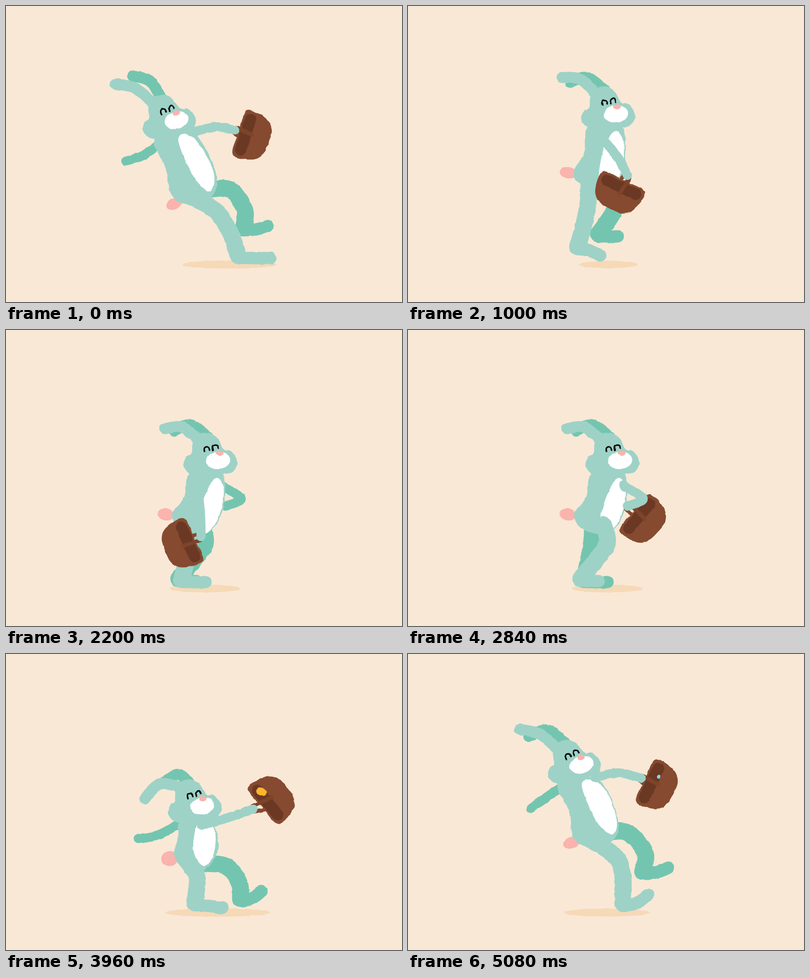
Recreate the animation shown at these times as an HTML page with a canvas. Size 800 by 600 pixels, loop 5.12 s.

```html
<!DOCTYPE html>
<html lang="en">
<head>
<meta charset="utf-8">
<title>Skipping rabbit</title>
<style>
  html, body { margin: 0; width: 100%; height: 100%; overflow: hidden; background: #f9e8d6; }
  canvas { display: block; filter: url(#rough); }
  svg { position: absolute; }
</style>
</head>
<body>
<svg width="0" height="0">
  <filter id="rough" x="0" y="0" width="100%" height="100%" color-interpolation-filters="sRGB">
    <feTurbulence type="fractalNoise" baseFrequency=".09" numOctaves="1" seed="4"/>
    <feDisplacementMap in="SourceGraphic" scale="4" xChannelSelector="R" yChannelSelector="G"/>
  </filter>
</svg>
<canvas id="stage" width="800" height="600"></canvas>
<script>
const ctx = document.getElementById('stage').getContext('2d');
const PERIOD = 1280, STEP = 40, RAD = Math.PI / 180;
const NEAR = '#9ed2c7', FAR = '#74c5b0', PINK = '#fab3ad', SHADOW = '#f6d9b6';
const BROWN = '#854a2f', DARK = '#6b3824', ORANGE = '#fdb52f', BLUE = '#86d8ff', PURPLE = '#7d6bb0';

// head: x, y, angle; tail: x, y, height, angle; shadow: x, radius; other parts are x, y pairs
const land = {
  head: [344, 231, -11], tail: [340, 401, 11, -25], shadow: [452, 95],
  nearEar: [221, 158, 262, 167], farEar: [256, 142, 291, 152],
  torso: [300, 268, 322, 328, 333, 380, 362, 401, 412, 390, 426, 350, 403, 288, 365, 250],
  belly: [348, 272, 372, 262, 402, 298, 421, 345, 411, 376, 378, 344],
  nearArm: [375, 256, 425, 245, 462, 252], farArm: [310, 280, 275, 304, 242, 314],
  nearLeg: [362, 382, 420, 412, 453, 460, 469, 506, 534, 511],
  farLeg: [400, 373, 452, 372, 482, 412, 480, 450, 529, 446]
};
const crouch = {
  head: [413, 319, -4], tail: [326, 410, 16, 0], shadow: [411, 103],
  nearEar: [300, 312, 328, 277], farEar: [333, 286, 362, 259],
  torso: [367, 345, 355, 378, 341, 410, 362, 440, 400, 443, 428, 408, 432, 370, 415, 340],
  belly: [398, 360, 425, 358, 431, 380, 418, 423, 396, 438, 380, 410],
  nearArm: [405, 363, 455, 353, 503, 334], farArm: [362, 356, 325, 380, 289, 393],
  nearLeg: [366, 418, 379, 455, 366, 480, 351, 504, 400, 511],
  farLeg: [395, 430, 434, 441, 456, 475, 457, 506, 499, 490]
};
const leanBack = {
  head: [319, 233, -20], tail: [337, 387, 16, 0], shadow: [436, 67],
  nearEar: [197, 175, 236, 175], farEar: [228, 154, 263, 161],
  torso: [303, 275, 314, 330, 328, 378, 356, 392, 400, 375, 413, 330, 398, 275, 355, 240],
  belly: [327, 275, 349, 251, 385, 270, 409, 330, 395, 375, 345, 345],
  nearArm: [290, 270, 251, 287, 233, 338], farArm: [360, 249, 405, 244, 451, 239],
  nearLeg: [355, 373, 425, 356, 466, 393, 462, 422, 517, 409],
  farLeg: [375, 365, 425, 408, 447, 450, 452, 486, 493, 470]
};
const upright = {
  head: [428, 264, 0], tail: [323, 374, 12, 10], shadow: [402, 72],
  nearEar: [321, 200, 356, 197], farEar: [340, 204, 372, 192],
  torso: [372, 290, 360, 338, 336, 375, 355, 405, 405, 412, 434, 375, 443, 325, 432, 285],
  belly: [400, 340, 424, 300, 440, 325, 430, 378, 405, 412, 386, 400],
  nearArm: [388, 325, 393, 375, 394, 419], farArm: [435, 315, 475, 342, 443, 357],
  nearLeg: [372, 388, 372, 420, 366, 460, 355, 506, 403, 511],
  farLeg: [395, 395, 403, 430, 385, 460, 349, 504, 385, 509]
};
const reach = {
  head: [350, 224, -13], tail: [330, 383, 12, -20], shadow: [402, 87],
  nearEar: [226, 153, 266, 162], farEar: [244, 167, 282, 154],
  torso: [303, 262, 325, 318, 333, 370, 360, 390, 410, 381, 425, 345, 405, 280, 370, 250],
  belly: [351, 266, 376, 256, 405, 285, 422, 340, 412, 366, 380, 338],
  nearArm: [378, 250, 425, 241, 471, 252], farArm: [310, 270, 280, 290, 248, 313],
  nearLeg: [362, 372, 419, 410, 434, 452, 434, 506, 485, 488],
  farLeg: [400, 362, 443, 362, 479, 402, 474, 441, 526, 433]
};

const combine = (a, b, rule) => Object.fromEntries(
  Object.keys(a).map(part => [part, a[part].map((v, i) => rule(v, b[part][i], part, i))]));
const swapSides = p => ({ ...p, nearArm: p.farArm, farArm: p.nearArm, nearLeg: p.farLeg, farLeg: p.nearLeg });
const raise = (p, dy) => combine(p, p, (v, _, part, i) =>
  part === 'shadow' || (part === 'head' || part === 'tail') && i !== 1 || i % 2 === 0 ? v : v - dy);

const apex = {
  ...raise(combine(upright, reach, (a, b) => (a + b) / 2), 68),
  shadow: [412, 58],
  nearArm: [395, 208, 440, 198, 482, 214], farArm: [340, 220, 305, 248, 258, 272],
  nearLeg: [360, 318, 386, 365, 388, 420, 378, 468, 420, 488],
  farLeg: [388, 322, 434, 320, 464, 360, 452, 402, 502, 404]
};
const leanOffset = combine(leanBack, swapSides(reach), (a, b) => a - b);
const landLeaning = combine(swapSides(land), leanOffset, (a, d) => a + 0.7 * d);

// basket: angle, then the hand's place relative to the opening
const keys = [
  [0, land, [-72, 1, -22]],
  [160, crouch, [-133, 9, -31]],
  [280, swapSides(upright), [-50, 0, -30]],
  [480, raise(swapSides(apex), 25), [75, 0, -30]],
  [600, leanBack, [30, -7, -38]],
  [640, landLeaning, [28, -6, -37]],
  [800, swapSides(crouch), [48, 0, -31]],
  [920, upright, [66, 1, -27]],
  [1120, apex, [-52, 0, -24]],
  [1240, reach, [-65, 0, -21]]
].map(([time, pose, basket]) => ({ time, pose: { ...pose, basket } }));

function keyAt(i) {
  const n = keys.length, turn = Math.floor(i / n), key = keys[i - turn * n];
  return { time: key.time + turn * PERIOD, pose: key.pose };
}

// Periodic cubic interpolation with unevenly spaced keys
function poseAt(t) {
  const i = keys.findLastIndex(k => k.time <= t);
  const [a, b, c, d] = [-1, 0, 1, 2].map(j => keyAt(i + j));
  const h0 = b.time - a.time, h1 = c.time - b.time, h2 = d.time - c.time;
  const u = (t - b.time) / h1, w = u * u * (3 - 2 * u);
  return combine(b.pose, b.pose, (v1, _, part, j) => {
    const v0 = a.pose[part][j], v2 = c.pose[part][j], v3 = d.pose[part][j];
    const s0 = (v1 - v0) / h0, s1 = (v2 - v1) / h1, s2 = (v3 - v2) / h2;
    const m1 = (s0 * h1 + s1 * h0) / (h0 + h1), m2 = (s1 * h2 + s2 * h1) / (h1 + h2);
    return v1 + (v2 - v1) * w + h1 * u * (1 - u) * (m1 * (1 - u) - m2 * u);
  });
}

function curve(flat, closed) {
  const n = flat.length / 2;
  const point = i => {
    const k = closed ? (i + n) % n : Math.max(0, Math.min(n - 1, i));
    return [flat[2 * k], flat[2 * k + 1]];
  };
  ctx.beginPath();
  ctx.moveTo(...point(0));
  for (let i = 0; i < (closed ? n : n - 1); i++) {
    const [a, b, c, d] = [-1, 0, 1, 2].map(j => point(i + j));
    ctx.bezierCurveTo(b[0] + (c[0] - a[0]) / 6, b[1] + (c[1] - a[1]) / 6,
      c[0] - (d[0] - b[0]) / 6, c[1] - (d[1] - b[1]) / 6, ...c);
  }
}
function fill(color) { ctx.fillStyle = color; ctx.fill(); }
function stroke(color, width) { ctx.strokeStyle = color; ctx.lineWidth = width; ctx.stroke(); }
function blob(flat, color) { curve(flat, true); fill(color); }
function limb(flat, color, width) { curve(flat, false); stroke(color, width); }
function oval(x, y, rx, ry, angle, color) {
  ctx.beginPath();
  ctx.ellipse(x, y, rx, ry, angle * RAD, 0, 7);
  fill(color);
}
function placed(x, y, angle, draw) {
  ctx.save();
  ctx.translate(x, y);
  ctx.rotate(angle * RAD);
  draw();
  ctx.restore();
}

function leg(flat, color) {
  const [ax, ay, tx, ty] = flat.slice(6);
  limb(flat.slice(0, 8), color, 34);
  ctx.beginPath();
  ctx.moveTo(ax, ay + 4.5);
  ctx.quadraticCurveTo(ax + 0.55 * (tx - ax), ay + 5, tx, ty);
  stroke(color, 25);
}

function ear(head, [tipX, tipY, midX, midY], baseX, baseY, color) {
  const c = Math.cos(head[2] * RAD), s = Math.sin(head[2] * RAD);
  limb([tipX, tipY, midX, midY, head[0] + baseX * c - baseY * s, head[1] + baseX * s + baseY * c], color, 22.5);
}

function drawHead([x, y, angle]) {
  placed(x, y, angle, () => {
    blob([-21, -56, -2, -46, 12, -22, 27, -18, 39, 3, 31, 23, 12, 28, -20, 32,
      -55, 28, -70, 10, -64, -7, -53, -14, -51, -34, -42, -50], NEAR);
    oval(0.5, 0.5, 24.5, 17.5, -5, '#fff');
    oval(3, -14, 7.5, 5.2, 0, PINK);
    for (const [ex, ey] of [[-22.5, -22], [-5, -25.5]]) {
      placed(ex, ey, -10, () => {
        ctx.beginPath();
        ctx.moveTo(-5.2, 4);
        ctx.arc(0, 0, 5.2, Math.PI, 0);
        ctx.lineTo(5.4, 2.5);
        stroke('#0b0b0b', 3.2);
      });
    }
  });
}

function drawBasket(p, t) {
  const [angle, hx, hy] = p.basket;
  placed(p.nearArm[4], p.nearArm[5], angle, () => {
    ctx.translate(-hx, -hy);
    ctx.beginPath();
    ctx.moveTo(-8, -10);
    ctx.lineTo(hx - 6, hy);
    stroke(BROWN, 8);
    blob([-38, -14, 0, -13, 39, -14, 50, -4, 43, 32, 25, 49, 0, 51, -28, 47, -44, 31, -50, -3], BROWN);
    ctx.beginPath();
    ctx.roundRect(-44, -10, 88, 23, 11.5);
    fill(DARK);
    if (t > 60 && t < 260) oval(25, 6, 11, 8, 158, ORANGE);
    if (t > 1180 && t < 1270) oval(18, 10, 4, 3.5, 0, BLUE);
    ctx.beginPath();
    ctx.moveTo(3, 14);
    ctx.lineTo(hx + 6, hy + 3);
    ctx.lineTo(hx - 5, hy - 2);
    stroke('#7d4429', 8);
  });
}

function drawEggs(t) {
  const u = (t - 600) / 120;
  if (Math.abs(u) > 1) return;
  for (const [x, y, color] of [[220, 220, BLUE], [214, 297, ORANGE], [254, 275, PURPLE]]) {
    oval(x + 6 * u, y + (395 - y) * (0.6 * u + 0.4 * u * u), 10.5, 7.8, 22, color);
  }
}

function draw(t) {
  const p = poseAt(t);
  ctx.fillStyle = '#f9e8d6';
  ctx.fillRect(0, 0, 800, 600);
  oval(p.shadow[0], 524, p.shadow[1], 6 + p.shadow[1] / 42, 0, SHADOW);
  oval(p.tail[0], p.tail[1], 17, p.tail[2], p.tail[3], PINK);
  limb(p.farArm, FAR, 18.5);
  leg(p.farLeg, FAR);
  ear(p.head, p.farEar, -21, -48, FAR);
  blob(p.torso, NEAR);
  blob(p.belly, '#fff');
  ear(p.head, p.nearEar, -40, -42, NEAR);
  drawHead(p.head);
  leg(p.nearLeg, NEAR);
  drawEggs(t);
  drawBasket(p, t);
  limb(p.nearArm, NEAR, 18.5);
}

ctx.lineCap = ctx.lineJoin = 'round';
function frame() {
  draw(Math.floor(performance.now() / STEP) * STEP % PERIOD);
  requestAnimationFrame(frame);
}
frame();
</script>
</body>
</html>
```
